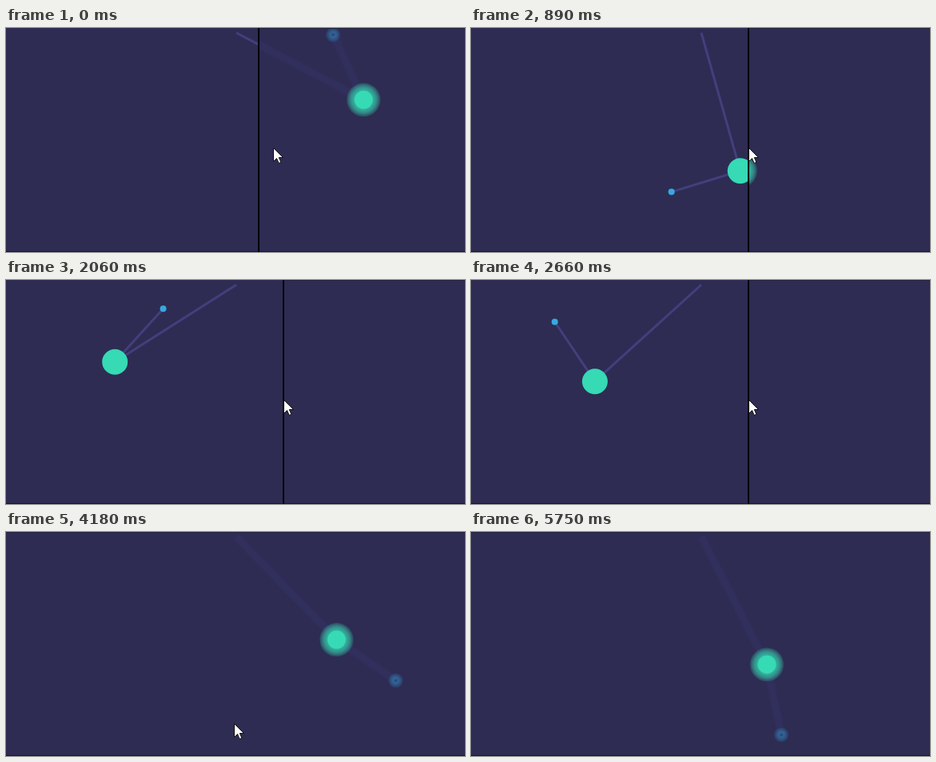
Animation, 574 px wide and 281 px high, one loop 5850 ms. Source, as an HTML page with a canvas:

```html
<!DOCTYPE html>
<html lang="en">
<head>
<meta charset="utf-8">
<title>Double pendulum, sharp and blurred</title>
<style>
  html, body { margin: 0; width: 100%; height: 100%; overflow: hidden; background: #2e2c53; }
  canvas { display: block; width: 574px; height: 281px; }
</style>
</head>
<body>
<canvas id="stage" width="574" height="281"></canvas>
<script>
const ctx = document.getElementById('stage').getContext('2d');
const W = 574, H = 281, LOOP = 5850;
const PIVOT = { x: 288, y: 6 }, ARM1 = 180, ARM2 = 90;
const GREEN = '#36dab4', BLUE = '#36a9e1';
const DRAG = [2950, 3300], LEAVE = [3860, 4180];

// time, upper arm angle, lower arm angle (degrees from straight down)
const poses = [
  [0, 62.2, -155], [450, 48, -121], [890, 15.8, -73.2], [1230, -13.8, 12],
  [1550, -39, 79.5], [2200, -58.2, 153], [2660, -47.7, 213.7], [3120, -33, 312],
  [3390, -19.4, 389.7], [3900, 22.5, 427], [4180, 44.1, 415.4], [4600, 64.3, 371.5],
  [5200, 61.2, 343], [5750, 27.1, 371.6]
];

// Smooth curve through the poses; each slope is weighted by the neighbouring spans.
function angle(column, t) {
  const last = poses.length - 2;
  const span = k => poses[k + 1][0] - poses[k][0];
  const rate = k => (poses[k + 1][column] - poses[k][column]) / span(k);
  const slope = k => {
    if (k === 0) return rate(0);
    if (k > last) return rate(last);
    return (rate(k - 1) * span(k) + rate(k) * span(k - 1)) / (span(k - 1) + span(k));
  };
  let i = 0;
  while (i < last && t >= poses[i + 1][0]) i++;
  const h = span(i), u = Math.min(1, (t - poses[i][0]) / h), v = 1 - u;
  return v * v * (1 + 2 * u) * poses[i][column] + u * u * (3 - 2 * u) * poses[i + 1][column]
    + h * u * v * (v * slope(i) - u * slope(i + 1));
}

const progress = (t, from, to) => Math.max(0, Math.min(1, (t - from) / (to - from)));

function swing(from, length, degrees) {
  const a = degrees * Math.PI / 180;
  return { x: from.x + length * Math.sin(a), y: from.y + length * Math.cos(a) };
}

function rods(points, width, color) {
  ctx.beginPath();
  points.forEach(p => ctx.lineTo(p.x, p.y));
  ctx.lineWidth = width;
  ctx.strokeStyle = color;
  ctx.stroke();
}

function disc(p, radius, color, alpha = 1) {
  ctx.globalAlpha = alpha;
  ctx.beginPath();
  ctx.arc(p.x, p.y, radius, 0, 2 * Math.PI);
  ctx.fillStyle = color;
  ctx.fill();
  ctx.globalAlpha = 1;
}

function halo(p, outer, inner, color, alpha) {
  for (let r = outer; r > inner; r -= 2) disc(p, r, color, alpha);
}

function clipped(x, width, draw) {
  ctx.save();
  ctx.beginPath();
  ctx.rect(x, 0, width, H);
  ctx.clip();
  draw();
  ctx.restore();
}

function drawSharp(points) {
  rods(points, 3, '#433f7c');
  disc(points[1], 16, GREEN);
  disc(points[2], 4, BLUE);
}

function drawBlurred(points) {
  rods(points, 13, '#2f2d57');
  rods(points, 9, '#312f5b');
  halo(points[1], 21, 11, GREEN, 0.24);
  disc(points[1], 11.5, GREEN);
  halo(points[2], 9, 3, BLUE, 0.17);
  disc(points[2], 1.5, '#2c4375');
  ctx.fillStyle = '#222140';
  ctx.fillRect(0, 0, W, 1);
}

function drawCursor(x, y) {
  const outline = [[0, 0], [0, 17], [4, 13], [6.6, 19], [9.4, 18], [6.8, 12], [12, 12]];
  ctx.beginPath();
  outline.forEach(([dx, dy]) => ctx.lineTo(x + dx + 0.5, y + dy + 0.5));
  ctx.closePath();
  ctx.fillStyle = '#fff';
  ctx.fill();
  ctx.lineWidth = 1;
  ctx.strokeStyle = '#111';
  ctx.stroke();
}

function draw(t) {
  const elbow = swing(PIVOT, ARM1, angle(1, t));
  const points = [PIVOT, elbow, swing(elbow, ARM2, angle(2, t))];
  const dragged = progress(t, ...DRAG);
  const left = Math.max(0, (t - LEAVE[0]) / (LEAVE[1] - LEAVE[0]));
  const split = left > 0 ? 0 : Math.round(316 + 31 * progress(t, 0, 500) - 164 * dragged);

  ctx.fillStyle = '#2e2c53';
  ctx.fillRect(0, 0, W, H);
  clipped(0, split, () => drawSharp(points));
  clipped(split, W - split, () => drawBlurred(points));
  ctx.fillStyle = '#17162c';
  ctx.fillRect(0, H - 1, W, 1);
  if (split) {
    ctx.fillStyle = '#000';
    ctx.fillRect(split - 1, 0, 2, H);
  }
  // The pointer drags the divider, then runs off the bottom edge.
  drawCursor(
    Math.round(334 + 13 * progress(t, 0, 250) - 166 * dragged + 104 * left),
    Math.round(150 + 11 * dragged + 79 * left)
  );
}

const start = performance.now();
function tick() {
  draw((performance.now() - start) % LOOP);
  requestAnimationFrame(tick);
}
tick();
</script>
</body>
</html>
```
